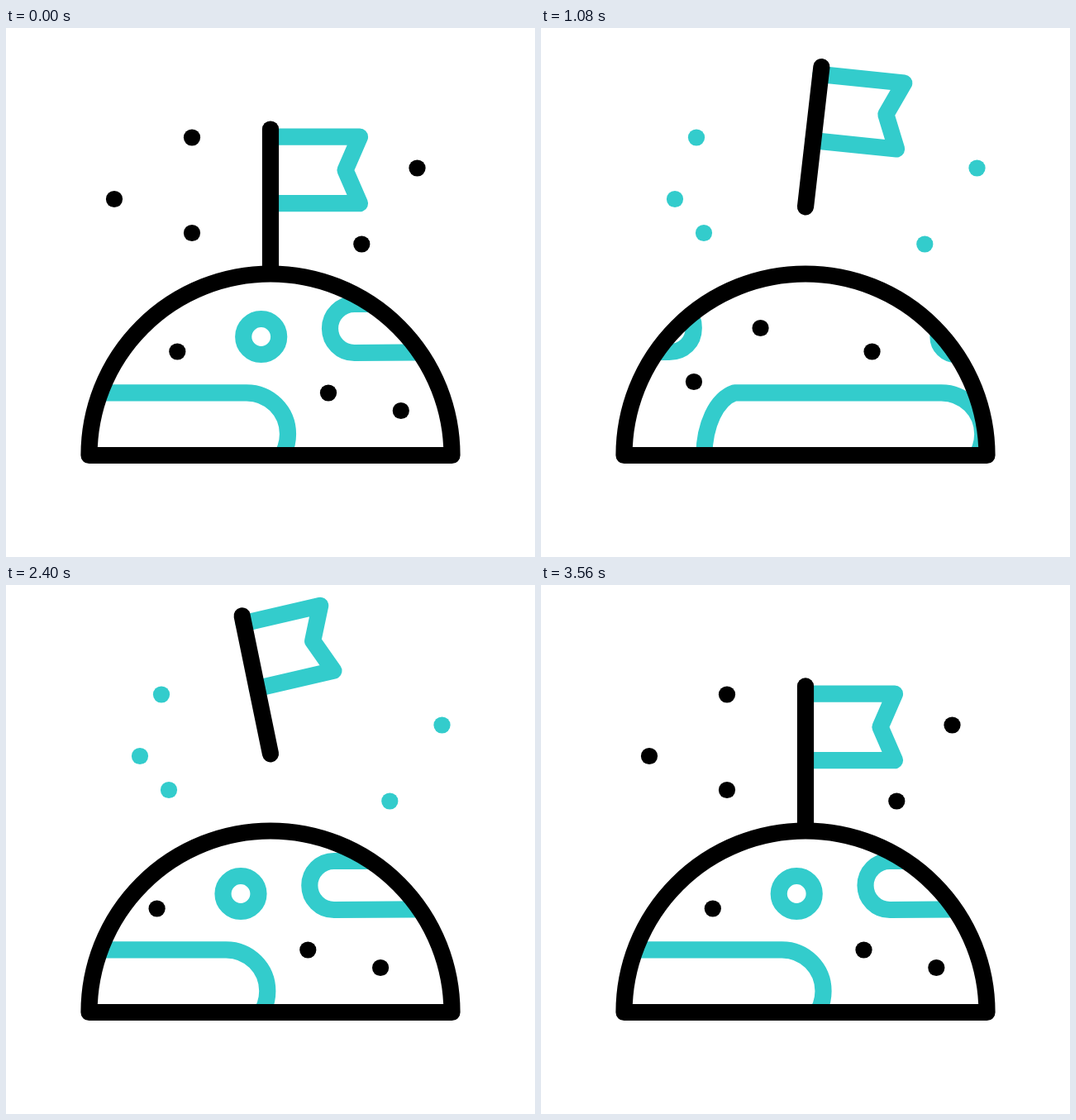
These frames come from a looping animation (640 px wide and 640 px high, 3.6 s). An HTML page with a canvas:

```html
<!DOCTYPE html>
<html lang="en">
<head>
<meta charset="utf-8">
<title>Flag on the moon</title>
<style>
  html, body { margin: 0; width: 100%; height: 100%; overflow: hidden; background: #fff; }
  canvas { display: block; width: 640px; height: 640px; }
</style>
</head>
<body>
<canvas id="stage" width="640" height="640"></canvas>
<script>
const ctx = document.getElementById('stage').getContext('2d');
const LOOP = 3600, TEAL = '#33cccc', BLACK = '#000';
const LINE = 20.2, DOT = 10.1;
const MOON = { x: 320, y: 517, r: 219.5 };
const SURFACE_PERIOD = 610;

// Each star has a black place, and a teal one shifted sideways.
const stars = [
  { x: 225, y: 132.5, shift: -37 },
  { x: 131, y: 207, shift: 31 },
  { x: 225, y: 248, shift: -28 },
  { x: 497.5, y: 169.5, shift: 30 },
  { x: 430.3, y: 261.5, shift: 34 }
];
const craters = [[207.3, 391.5], [390, 441.5], [477.8, 463], [72.3, 363], [-8.3, 428]];

const clamp = (v, low, high) => Math.min(high, Math.max(low, v));

// Eased step from 0 to 1 between two times.
function ramp(t, from, to) {
  const u = clamp((t - from) / (to - from), 0, 1);
  return u * u * (3 - 2 * u);
}

const surfaceOffset = t =>
  (SURFACE_PERIOD + 43) * ramp(t, 0, 3000) - 43 * ramp(t, 3000, LOOP);

const flagLift = t => 92 * (ramp(t, 0, 1460) - ramp(t, 2250, 3580));

const flagFold = t => 22 * (ramp(t, 640, 1860) - ramp(t, 1860, 3080));

// Lean back, then swing right, left, right and settle upright.
const flagTilt = t =>
  -14.5 * ramp(t, 0, 635) + 38.5 * ramp(t, 635, 1475) - 39 * ramp(t, 1475, 2260)
  + 39 * ramp(t, 2260, 3040) - 24 * ramp(t, 3040, 3560);

// 1 is fully black, -1 fully teal; the sign flips at each swap.
const starPhase = t =>
  [630, 1450, 2270, 3280].reduce((phase, swap) => phase * clamp((swap - t) / 110, -1, 1), 1);

function dot(x, y, r, color) {
  if (r <= 0) return;
  ctx.fillStyle = color;
  ctx.beginPath();
  ctx.arc(x, y, r, 0, Math.PI * 2);
  ctx.fill();
}

function stroke(color, build) {
  ctx.strokeStyle = color;
  ctx.beginPath();
  build();
  ctx.stroke();
}

function drawStars(phase) {
  for (const { x, y, shift } of stars) {
    dot(x, y, DOT * phase, BLACK);
    dot(x + shift, y, -DOT * phase, TEAL);
  }
}

function drawSurface(offset) {
  ctx.save();
  ctx.translate(offset, 0);
  stroke(TEAL, () => ctx.arc(308.7, 373.5, 21.5, 0, Math.PI * 2));
  stroke(TEAL, () => {
    ctx.arc(421.5, 363.5, 29.5, Math.PI / 2, Math.PI * 1.5);
    ctx.lineTo(572, 334);
    ctx.bezierCurveTo(591, 334, 601.5, 346, 601.5, 363);
    ctx.bezierCurveTo(601.5, 380, 589, 392, 572, 392);
    ctx.closePath();
  });
  stroke(TEAL, () => {
    ctx.moveTo(4, 520);
    ctx.bezierCurveTo(4, 480, 19, 449, 41, 441.3);
    ctx.lineTo(291, 441.3);
    ctx.arc(291, 491.3, 50, -Math.PI / 2, Math.PI / 4);
  });
  for (const [x, y] of craters) dot(x, y, DOT, BLACK);
  ctx.restore();
}

function moonPath() {
  ctx.arc(MOON.x, MOON.y, MOON.r, Math.PI, 0);
  ctx.closePath();
}

function drawFlag(lift, tilt, fold) {
  const top = -161.3, bottom = -80.8, right = 108 - fold, rise = -0.18 * fold;
  ctx.save();
  ctx.translate(320, 293 - lift);
  ctx.rotate(tilt * Math.PI / 180);
  stroke(TEAL, () => {
    ctx.moveTo(0, top);
    ctx.lineTo(right, top + rise);
    ctx.lineTo(right - 17.5, (top + bottom) / 2 + rise);
    ctx.lineTo(right, bottom + rise);
    ctx.lineTo(0, bottom);
  });
  stroke(BLACK, () => {
    ctx.moveTo(0, 0);
    ctx.lineTo(0, -170.5);
  });
  ctx.restore();
}

function draw(t) {
  ctx.fillStyle = '#fff';
  ctx.fillRect(0, 0, 640, 640);
  ctx.lineWidth = LINE;
  ctx.lineCap = ctx.lineJoin = 'round';

  drawStars(starPhase(t));

  ctx.save();
  ctx.beginPath();
  moonPath();
  ctx.clip();
  drawSurface(surfaceOffset(t));
  drawSurface(surfaceOffset(t) - SURFACE_PERIOD);
  ctx.restore();

  drawFlag(flagLift(t), flagTilt(t), flagFold(t));
  stroke(BLACK, moonPath);
}

const start = performance.now();
function frame() {
  draw((performance.now() - start) % LOOP);
  requestAnimationFrame(frame);
}
frame();
</script>
</body>
</html>
```
